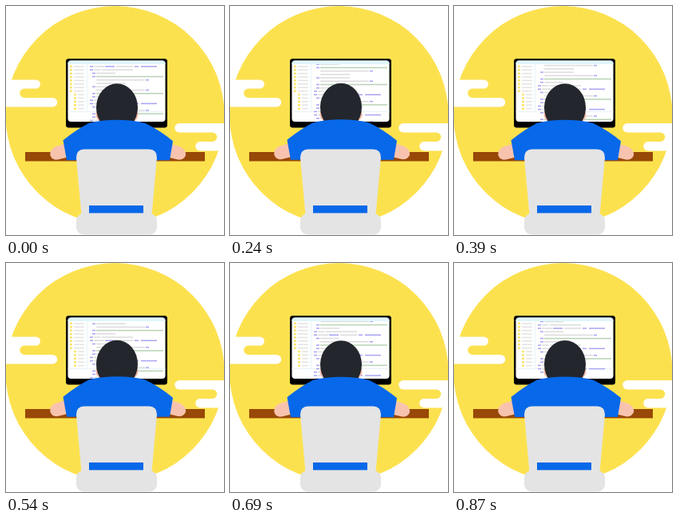
Recreate the animation shown at these times as an HTML page. Size 273 by 287 pixels, loop 900 ms.

```html
<!DOCTYPE html>
<html lang="en">
<head>
<meta charset="utf-8">
<title>Programmer at work</title>
<style>
  html, body { margin: 0; width: 100%; height: 100%; overflow: hidden; background: #fff; }
  svg { display: block; width: 100%; height: 100%; }
</style>
</head>
<body>
<svg viewBox="0 0 273 287">
  <defs><clipPath id="page"><path d="M102 73H199V145H102Z"/></clipPath></defs>
  <circle cx="136.5" cy="137" r="137" fill="#fce14f"/>
  <g fill="#fff">
    <path d="M0 92.5H37.5a5.5 5.5 0 0 1 0 11H23a5.75 5.75 0 0 0 0 11.5H58.5a5.75 5.75 0 0 1 0 11.5H0Z"/>
    <path d="M273 147H217a5.75 5.75 0 0 0 0 11.5H258.500a5.75 5.75 0 0 1 0 11.5H243a5.75 5.75 0 0 0 0 11.5H273Z"/>
  </g>
  <rect x="24" y="183" width="225" height="11.500" fill="#984807"/>
  <rect x="75" y="66" width="127" height="86.500" rx="3.500"/>
  <rect x="77.500" y="68.500" width="122" height="76.500" rx="4" fill="#fff"/>
  <path d="M77.500 73V72.500a4 4 0 0 1 4-4H195.500a4 4 0 0 1 4 4V73Z" fill="#e0f6fa"/>
  <path d="M101.500 73V132.500M77.500 132.500H199.500" stroke="#e4eff6" stroke-width=".8"/>
  <g id="files"></g>
  <g clip-path="url(#page)"><g id="code"></g></g>
  <g id="person">
    <path d="M75 172 62 176Q54 180 55.500 187Q58 194 66 192L78 189ZM205 172 218 176Q226 180 225 187Q222 194 214 192L202 189Z" fill="#f8c3ae"/>
    <path d="M112.500 130H165.500V150H112.500Z" fill="none"/>
    <ellipse cx="139" cy="136" rx="26.500" ry="15" fill="#f3b9a6"/>
    <ellipse cx="139" cy="127" rx="26" ry="30" fill="#23262d"/>
    <path d="M71.500 168Q89 154 104 146.500Q119 142.500 139 142.500T174 146.500Q192 155 209 169L205 193H76Z" fill="#0768e9"/>
  </g>
  <path d="M88 190Q88 179.500 98 179.500H179Q189 179.500 189 190L182.500 262H94.500Z" fill="#e4e4e4"/>
  <rect x="88" y="260" width="101" height="26.500" rx="9" fill="#e4e4e4"/>
  <rect x="104" y="250" width="68" height="9.500" fill="#0768e9"/>
</svg>
<script>
const LOOP = 900, STEP = 30, SPEED = 0.0465, PITCH = 4.23;
const PURPLE = '#a9a5f2', GREY = '#dcdcdc', GREEN = '#b9d3b6', YELLOW = '#fbe36a';
const files = document.getElementById('files');
const code = document.getElementById('code');
const person = document.getElementById('person');

function bar(parent, x1, x2, y, fill, height = 1.5) {
  const rect = document.createElementNS('http://www.w3.org/2000/svg', 'rect');
  const attrs = { x: x1, y: y - height / 2, width: x2 - x1, height, fill };
  for (const name in attrs) rect.setAttribute(name, attrs[name]);
  parent.append(rect);
}

for (let i = 0; i < 13; i++) {
  const x = i < 8 ? 80 : 85, y = 75.8 + i * 4.4;
  bar(files, x, x + 3, y, YELLOW, 2.4);
  bar(files, x + 5, 98, y, '#e3e3e3');
}

// Each kind of code line is a list of [start, end, colour].
const indent = [108, 112, PURPLE];
const lines = {
  call: [[105, 109, PURPLE], [110, 123, GREY], [124, 136, PURPLE], [138, 159, GREY],
         [161, 166, PURPLE], [169, 189, PURPLE]],
  head: [[105, 109, PURPLE], [110, 118.5, GREY], [120, 159, GREY]],
  short: [indent, [113, 137, GREY]],
  note: [indent, [113, 197, GREEN]],
  long: [[113, 174, GREY], [175, 179, PURPLE]],
  plain: [[113, 150, GREY]],
  item: [indent, [113, 150, GREY]]
};
const listing = ('call head short note long plain item long note short head call ' +
  'short long note short head call item long note short head call short').split(' ');
listing.forEach((kind, i) => {
  for (const [x1, x2, fill] of lines[kind]) bar(code, x1, x2, 75.8 + i * PITCH, fill);
});

function draw(now) {
  const t = Math.floor(now % LOOP / STEP) * STEP;
  const bob = 0.5 * Math.cos(2 * Math.PI * (t / 300 - 0.15));
  code.setAttribute('transform', `translate(0 ${-t * SPEED})`);
  person.setAttribute('transform', `translate(0 ${bob})`);
  requestAnimationFrame(draw);
}
draw(performance.now());
</script>
</body>
</html>
```
